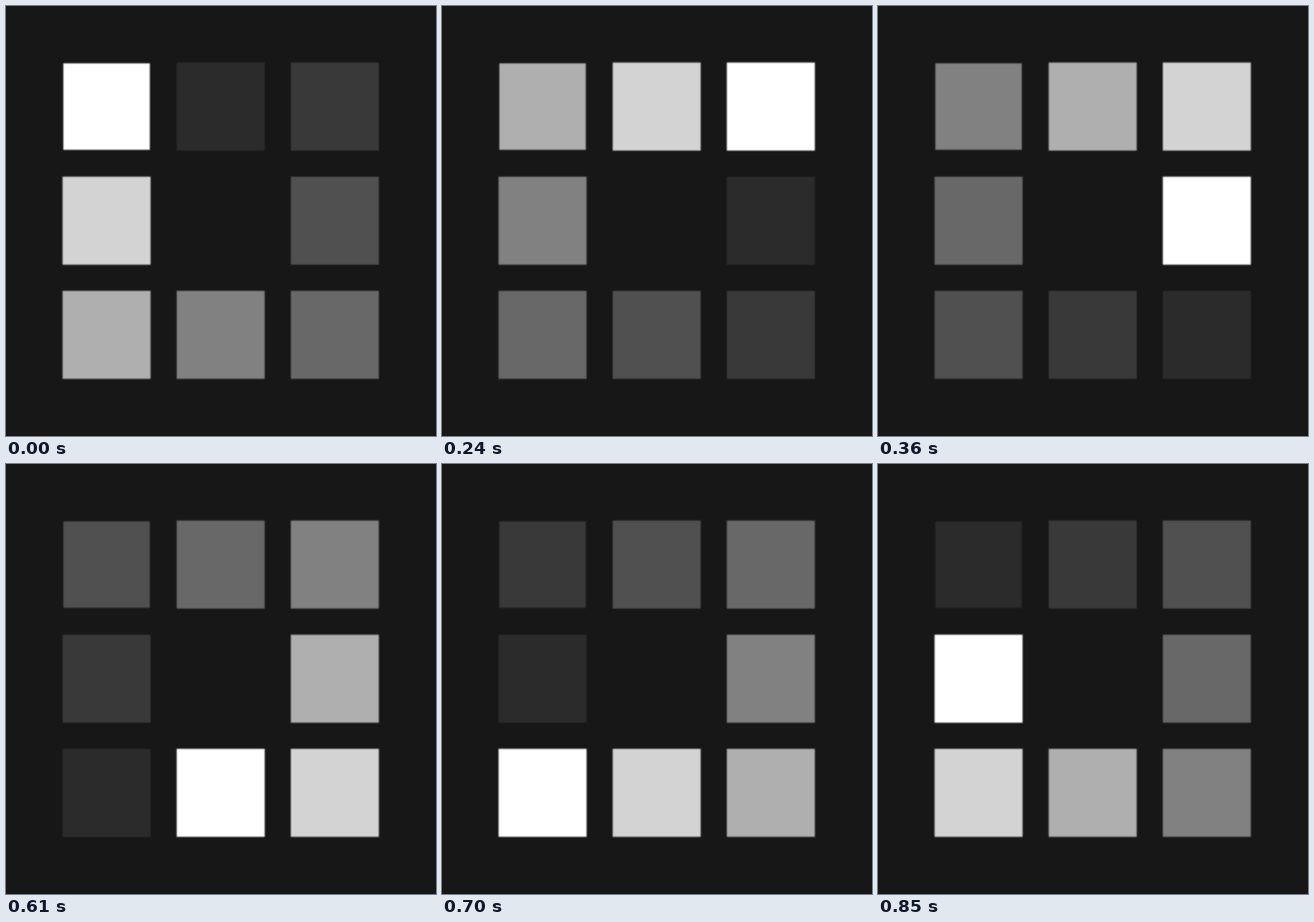
Animation of 720 by 720 pixels, one loop 0.94 s. Source, as an HTML page:

```html
<!DOCTYPE html>
<html lang="en">
<head>
<meta charset="utf-8">
<title>Square spinner</title>
<style>
  html, body { margin: 0; width: 100%; height: 100%; overflow: hidden; background: #171717; }
  svg { display: block; width: 100vw; height: 100vh; }
</style>
</head>
<body>
<svg viewBox="0 0 720 720">
  <filter id="soft" color-interpolation-filters="sRGB"><feGaussianBlur stdDeviation="0.85"/></filter>
  <g filter="url(#soft)"></g>
</svg>
<script>
const LOOP = 940;
const COUNT = 8;
const PITCH = 191.1;
const STARTS = [0, 120, 240, 360, 450, 610, 700, 850];
// Gray level by steps since the cell was lit
const GRAYS = [255, 211, 175, 129, 104, 80, 57, 43];

const group = document.querySelector('g');

function addCell(i) {
  // Clockwise around the centre, from the top left
  const angle = (i - 3) * Math.PI / 4;
  const size = i ? 147.4 : 144.8;
  const place = v => 359.5 + PITCH * Math.round(v) - size / 2;
  const box = { x: place(Math.cos(angle)), y: place(Math.sin(angle)), width: size, height: size };
  const rect = document.createElementNS('http://www.w3.org/2000/svg', 'rect');
  for (const name in box) rect.setAttribute(name, box[name]);
  group.append(rect);
  return rect;
}

function frameAt(time, step, i) {
  const gray = GRAYS[(step - i + COUNT) % COUNT];
  return { offset: time / LOOP, fill: `rgb(${gray}, ${gray}, ${gray})`, easing: 'step-end' };
}

for (let i = 0; i < COUNT; i++) {
  const frames = [...STARTS, LOOP].map((time, step) => frameAt(time, step, i));
  addCell(i).animate(frames, { duration: LOOP, iterations: Infinity }).startTime = 0;
}
</script>
</body>
</html>
```
